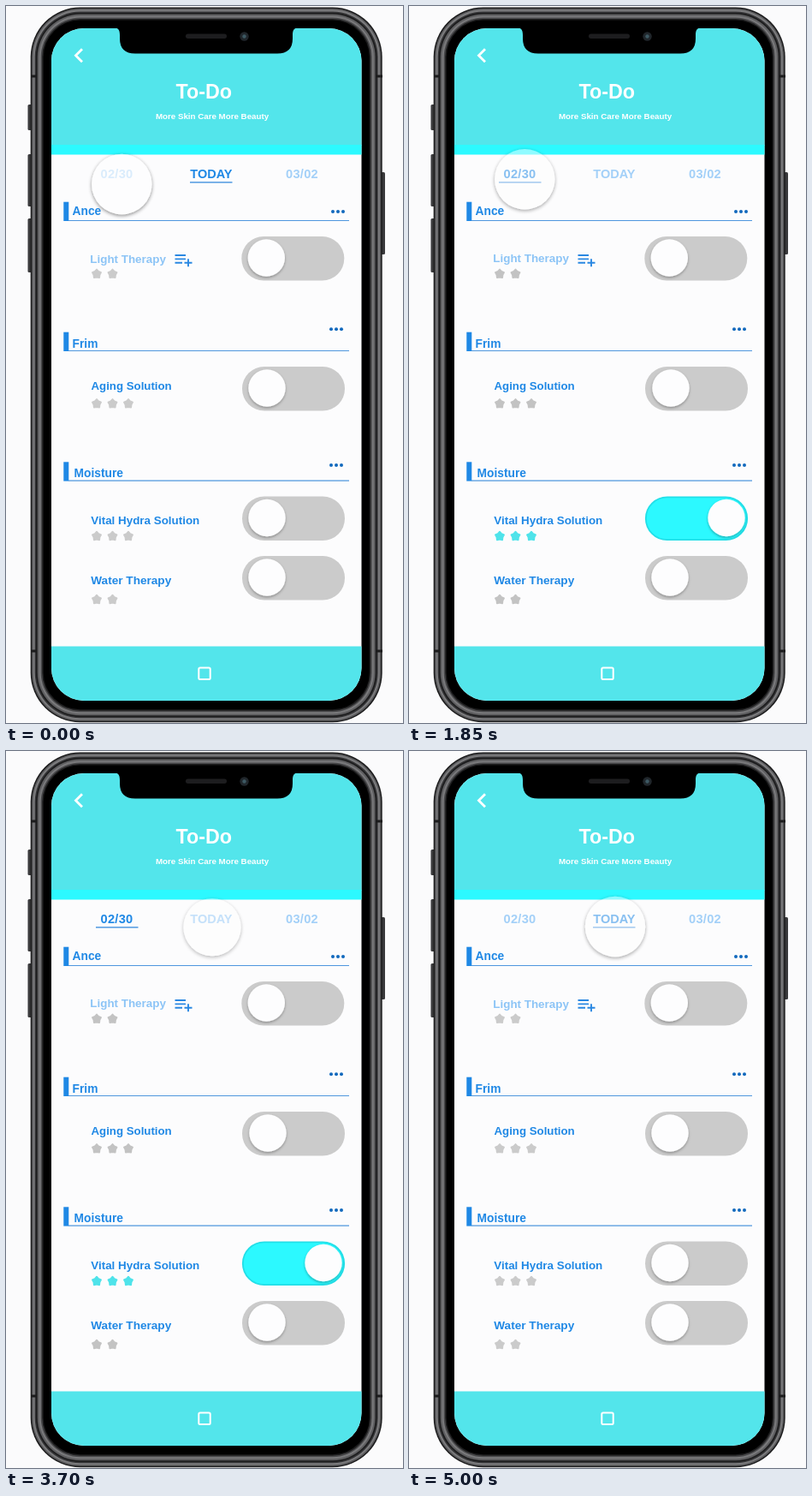
These frames come from a looping animation (464x837 px, 5050 ms). An HTML page:

```html
<!DOCTYPE html>
<html lang="en">
<head>
<meta charset="utf-8">
<title>To-Do</title>
<style>
html, body { margin: 0; width: 100%; height: 100%; overflow: hidden; background: #fbfbfc; }
svg { display: block; width: 464px; height: 837px; }
text { font-family: "Liberation Sans", Arial, sans-serif; font-weight: bold; }
</style>
</head>
<body>
<svg id="stage" viewBox="0 0 464 837">
  <defs>
    <filter id="knobShade" x="-30%" y="-30%" width="160%" height="160%">
      <feDropShadow dx="0" dy="1.5" stdDeviation="1.5" flood-opacity=".32"/>
    </filter>
    <filter id="tapShade" x="-30%" y="-30%" width="160%" height="160%">
      <feDropShadow dx="0" dy="1.5" stdDeviation="1.9" flood-opacity=".75"/>
    </filter>
    <clipPath id="screen"><rect x="53" y="26" width="362.5" height="785" rx="38"/></clipPath>
  </defs>

  <g fill="#3a3a3c">
    <rect x="25.5" y="115" width="5" height="30" rx="1.5"/>
    <rect x="25.5" y="173" width="5" height="61" rx="1.5"/>
    <rect x="25.5" y="248" width="5" height="63" rx="1.5"/>
    <rect x="438" y="194" width="5" height="96" rx="1.5"/>
  </g>
  <g id="body"></g>
  <path d="M29 82h7M433 82h7M29 753h7M433 753h7" stroke="#1c1c1d" stroke-width="3"/>

  <g clip-path="url(#screen)">
    <rect x="53" y="26" width="363" height="786" fill="#fcfcfd"/>
    <rect x="53" y="26" width="363" height="137" fill="#53e5eb"/>
    <rect x="53" y="162" width="363" height="11.5" fill="#2cf9ff"/>
    <rect x="53" y="747.5" width="363" height="65" fill="#53e5eb"/>
    <g id="content"></g>
  </g>

  <path d="M127 25C132 26 133 29 133 34V38Q133 55.5 151 55.5H317Q335 55.5 335 38V34C335 29 336 26 341 25Z"/>
  <rect x="210" y="32.5" width="48" height="5.5" rx="2.7" fill="#1d1d1f"/>
  <circle cx="278.5" cy="35.5" r="5.2" fill="#20262b"/>
  <circle cx="278.5" cy="35.5" r="2.2" fill="#3d5963"/>

  <path d="M89 50.3L81.5 57.8L89 65.3" fill="none" stroke="#fff" stroke-width="2.8"/>
  <rect x="225.3" y="772.6" width="13.4" height="13.4" rx="1.5" fill="none" stroke="#fff" stroke-width="2"/>
  <g fill="#fff" text-anchor="middle">
    <text x="231.2" y="108" font-size="23.3">To-Do</text>
    <text x="241" y="132" font-size="9.75">More Skin Care More Beauty</text>
  </g>
  <path id="underline" stroke="#2f86dc" stroke-width="1.4"/>
  <circle id="tap" fill="#fff" filter="url(#tapShade)"/>
</svg>
<script>
const LOOP = 5050, BLUE = '#1f88e5', PALE = '#a3d0f8', LINE = '#4f97de';
const $ = id => document.getElementById(id);

const text = (x, y, size, fill, str, extra = '') =>
  `<text x="${x}" y="${y}" font-size="${size}" fill="${fill}" ${extra}>${str}</text>`;

// Phone body: nested rounded rings, [inset, colour]
const rings = [[0, '#1b1b1c'], [1.5, '#5a5a5c'], [3, '#7c7c7e'], [5, '#343436'], [6.5, '#1a1a1b'],
  [8, '#5e5e60'], [10, '#7a7a7c'], [12, '#4a4a4c'], [13.5, '#1e1e1f'], [15, '#000']];
$('body').innerHTML = rings.map(([d, fill]) =>
  `<rect x="${28.7 + d}" y="${1.6 + d}" width="${411 - 2 * d}" height="${834.6 - 2 * d}" rx="${58 - d}" fill="${fill}"/>`).join('');

function star(cx, cy, fill) {
  const pts = [];
  for (let i = 0; i < 10; i++) {
    const r = i % 2 ? 3.7 : 5.3, a = i * Math.PI / 5;
    pts.push((cx + r * Math.sin(a)).toFixed(2) + ',' + (cy - r * Math.cos(a)).toFixed(2));
  }
  return `<polygon points="${pts.join(' ')}" fill="${fill}" stroke="${fill}" stroke-width="1.8" stroke-linejoin="round"/>`;
}

const stars = (n, y, fill) =>
  Array.from({ length: n }, (_, i) => star(106 + i * 18.5, y, fill)).join('');

function section(label, x, baseline, y, dotX, dotY) {
  const dots = [0, 6, 12].map(d => `<circle cx="${dotX + d}" cy="${dotY}" r="2" fill="#1269bd"/>`).join('');
  return `<rect x="67.3" y="${y - 22}" width="6" height="22.3" fill="${BLUE}"/>
    <path d="M73 ${y - .2}H401" stroke="${LINE}" stroke-width="1.2"/>` +
    text(x, baseline, 13.8, BLUE, label) + dots;
}

function toggle(x, y, on, nudge = 0) {
  const track = on
    ? `<rect x="${x + .8}" y="${y + .8}" width="118.4" height="49.9" rx="24.9" fill="#2cf9ff" stroke="#22dfe8" stroke-width="1.8"/>`
    : `<rect x="${x}" y="${y}" width="120" height="51.5" rx="25.7" fill="#cbcbcb"/>`;
  return track + `<circle cx="${x + (on ? 95 : 29) + nudge}" cy="${y + 25}" r="21.7" fill="#fdfdfe" filter="url(#knobShade)"/>`;
}

function page(past) {
  const grey = past ? '#c3c3c3' : '#cbcbcb';
  const size = 13.4;
  return text(110.5, 200.5, 14.6, past ? BLUE : PALE, '02/30', 'letter-spacing=".3"') +
    text(215.3, 200.5, 14.5, past ? PALE : BLUE, 'TODAY') +
    text(327, 200.5, 14.6, PALE, '03/02', 'letter-spacing=".3"') +
    section('Ance', 77.5, 244, 250.7, 382, 240) +
    section('Frim', 77.5, 399, 402.7, 380, 377.3) +
    section('Moisture', 79.5, 549.6, 554.3, 380, 536) +
    text(98.3, past ? 299 : 300, size, '#8cc4f6', 'Light Therapy') +
    `<path d="M197.5 291H210M197.5 295.4H210M197.5 299.8H206M208.5 299.8H217.5M213 295.3V304.3" stroke="#2a88e2" stroke-width="1.9"/>` +
    text(99.5, 448.3, 13.25, BLUE, 'Aging Solution') +
    text(99.3, 605.3, size, BLUE, 'Vital Hydra Solution') +
    text(99.3, 675, 13.6, BLUE, 'Water Therapy') +
    stars(2, 312.8, grey) + stars(3, 464.3, grey) +
    stars(3, 619, past ? '#4fe3ea' : grey) + stars(2, 693, grey) +
    toggle(275.3, 269, false) + toggle(276, 421, false, past ? 1 : 0) +
    toggle(276, 572.5, past) + toggle(276, 642, false);
}

$('content').innerHTML =
  `<g id="today">${page(false)}</g><g id="past">${page(true)}</g><g id="back">${page(false)}</g>`;

// Smooth 0..1 between two times
function ease(t, from, to) {
  const p = Math.min(1, Math.max(0, (t - from) / (to - from)));
  return p * p * (3 - 2 * p);
}
const pulse = (t, mid, half) => ease(t, mid - half, mid) - ease(t, mid, mid + half);

function fade(id, o) {
  $(id).setAttribute('opacity', o);
  $(id).style.display = o > 0 ? '' : 'none';
}

function draw(t) {
  const out = ease(t, 1060, 1630), home = ease(t, 3910, 4480);
  fade('today', 1 - out);
  fade('past', out * (1 - home));
  fade('back', home);

  const at = out - home, spread = 8 * Math.sin(Math.PI * at);
  const x = 215 - 110 * at;
  $('underline').setAttribute('d', `M${x - spread / 2} 205.9H${x + 49.5 + spread / 2}`);

  const go = ease(t, 2150, 3150), arc = Math.sin(Math.PI * go);
  const press = pulse(t, 850, 260) + pulse(t, 3700, 260);
  const tap = $('tap');
  tap.setAttribute('cx', 135.3 + 105.7 * go);
  tap.setAttribute('cy', 208 - 5.7 * ease(t, 0, 500) + 2.7 * go + 3.3 * arc + .7 * press);
  tap.setAttribute('r', 35.2 - 1.6 * press + .8 * arc);
  tap.setAttribute('opacity', .6 - .13 * ease(t, 0, 500) - .1 * press - .17 * arc);
}

const start = performance.now();
function tick() {
  const t = (performance.now() - start) % LOOP;
  draw(t < 100 ? 0 : Math.floor(t / 50) * 50);
  requestAnimationFrame(tick);
}
tick();
</script>
</body>
</html>
```
